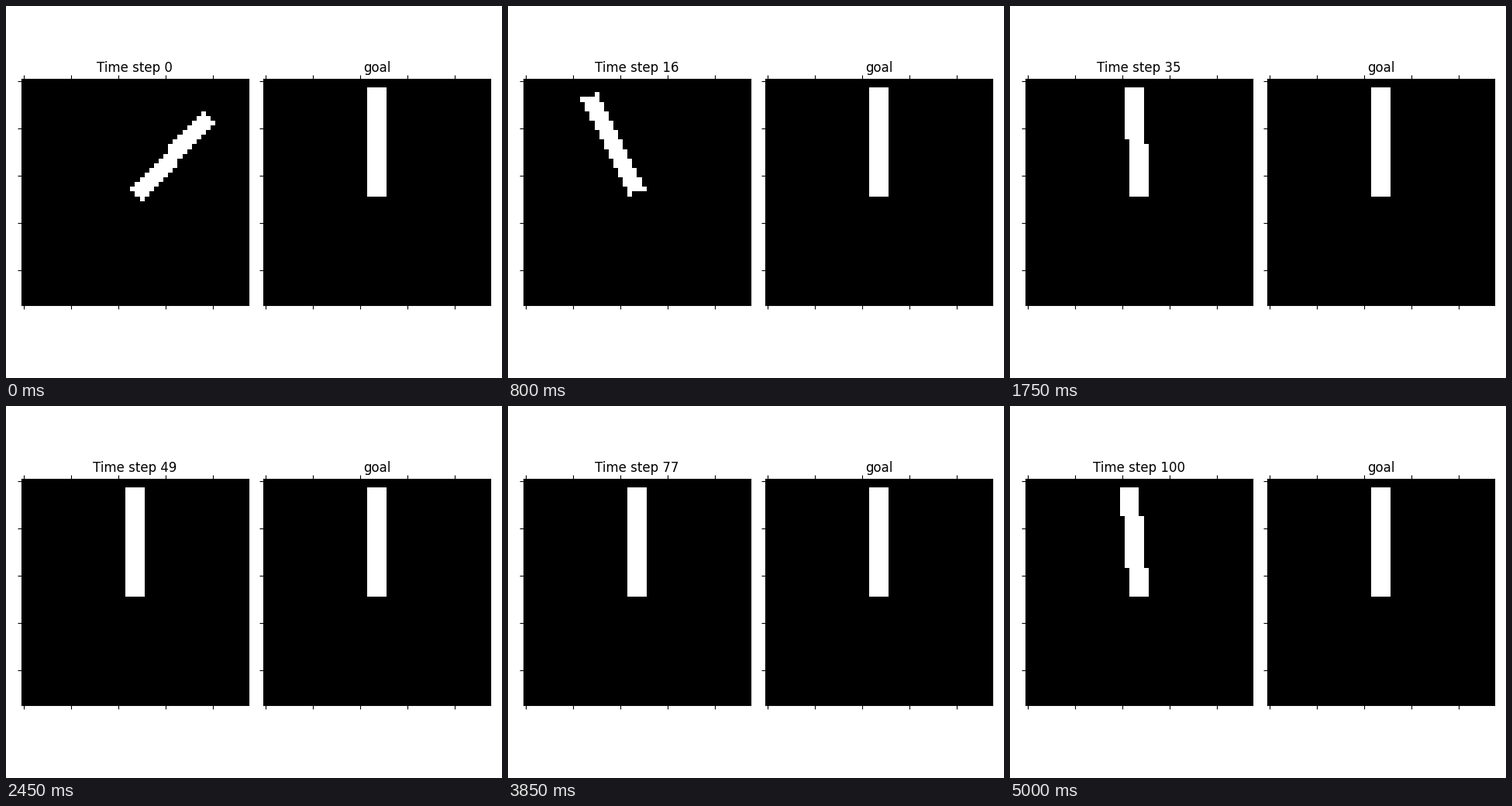
A matplotlib script for the animation above (5050 ms loop, 640x480 px).

```python
import math

import numpy as np
import matplotlib.pyplot as plt
from matplotlib.animation import FuncAnimation

W, H, DPI = 640, 480, 100
STEPS, INTERVAL = 101, 50
GRID, PIVOT, LENGTH = 48, 24, 22

# (time step, rod angle in degrees from upright, clockwise positive)
KEYS = [(0, 45), (15, -27), (22, -1), (28, 1.5), (33, 1.5), (35, -1.5),
        (40, 6.5), (45, 2), (49, 1), (53, -1.5), (60, -4), (66, -1.5),
        (71, 1.5), (78, 1), (83, 6.5), (88, -1.5), (94, -1.5), (99, -4),
        (100, -4)]


def angle_at(step):
    """Ease between neighbouring key angles."""
    for (t0, a0), (t1, a1) in zip(KEYS, KEYS[1:]):
        if step <= t1:
            ease = (1 - math.cos(math.pi * (step - t0) / (t1 - t0))) / 2
            return a0 + (a1 - a0) * ease
    return KEYS[-1][1]


def half_up(v):
    return int(math.copysign(math.floor(abs(v) + 0.5), v))


def half_down(v):
    return int(math.copysign(math.ceil(abs(v) - 0.5), v))


def rod_corners(angle):
    """Integer corners of a rod four cells wide."""
    rad = math.radians(angle)
    tip_x = int(PIVOT + LENGTH * math.sin(rad))
    tip_y = int(PIVOT - LENGTH * math.cos(rad))
    dx, dy = tip_x - PIVOT, tip_y - PIVOT
    size = math.hypot(dx, dy)
    x_min, x_max = half_down(dy / size), half_down(2 * dy / size)
    y_min, y_max = half_up(dx / size), half_up(2 * dx / size)
    return [(PIVOT - x_min, PIVOT + y_max), (tip_x - x_min, tip_y + y_max),
            (tip_x + x_max, tip_y - y_min), (PIVOT + x_max, PIVOT - y_min)]


def render(angle):
    """Fill the rod row by row on the coarse grid."""
    cells = np.zeros((GRID, GRID))
    corners = rod_corners(angle)
    edges = list(zip(corners, corners[1:] + corners[:1]))
    rows = [y for _, y in corners]
    for y in range(min(rows), max(rows) + 1):
        xs = [x for x, cy in corners if cy == y]
        for (x0, y0), (x1, y1) in edges:
            if min(y0, y1) < y < max(y0, y1):
                xs.append(x0 + (y - y0) * (x1 - x0) / (y1 - y0))
        cells[y, half_up(min(xs)):half_down(max(xs)) + 1] = 1
    return cells


fig = plt.figure(figsize=(W / DPI, H / DPI), dpi=DPI, facecolor="white")

PAD = 10.8 * DPI / 72
TICK = 3.5 * DPI / 72
SIDE = (W - 3 * PAD - 2 * TICK) / 2


def add_panel(left, title, angle):
    ax = fig.add_axes([left / W, (H - SIDE) / 2 / H, SIDE / W, SIDE / H])
    image = ax.imshow(render(angle), cmap="gray", vmin=0, vmax=1,
                      interpolation="nearest", aspect="auto")
    ax.set_xticks(range(0, GRID, 10))
    ax.set_yticks(range(0, GRID, 10))
    ax.tick_params(top=True, labelbottom=False, labelleft=False)
    return image, ax.set_title(title, fontsize=12, y=1.0)


rod, caption = add_panel(PAD + TICK, "Time step 0", angle_at(0))
add_panel(W - PAD - SIDE, "goal", 0)


def update(step):
    rod.set_data(render(angle_at(step)))
    caption.set_text(f"Time step {step}")
    return rod, caption


anim = FuncAnimation(fig, update, frames=STEPS, interval=INTERVAL,
                     repeat=True, repeat_delay=0, blit=False)
plt.show()
```
